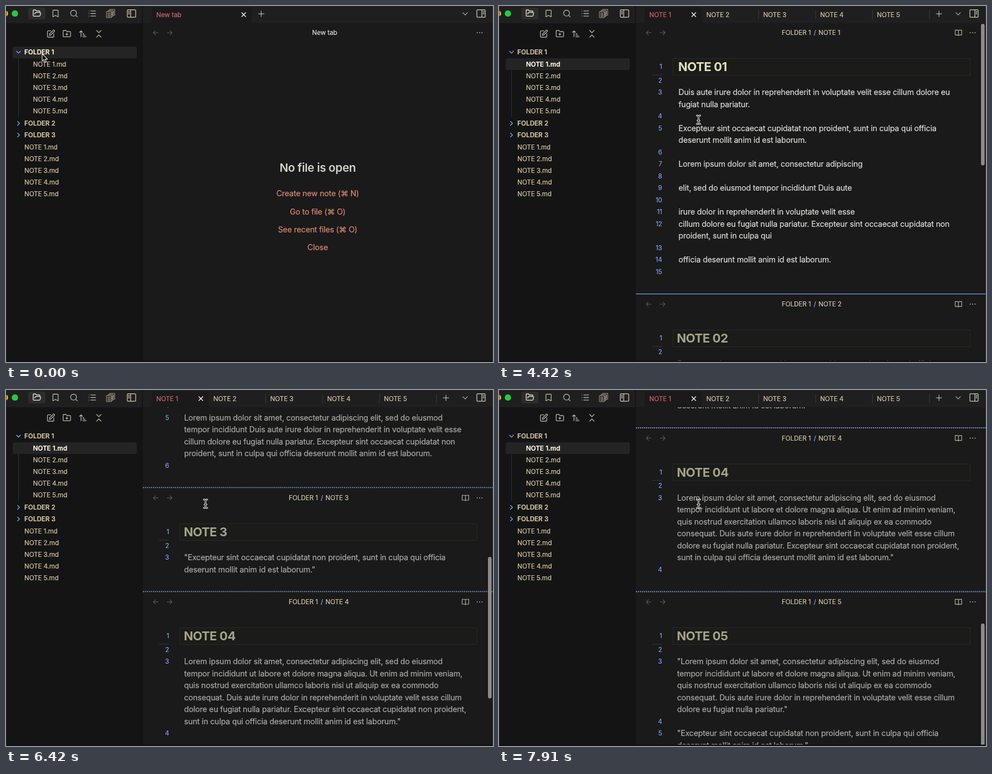
Animation of 875 by 640 pixels, one loop 8000 ms. Source, as an HTML page:

```html
<!DOCTYPE html>
<html lang="en">
<head>
<meta charset="utf-8">
<title>Notes in one scroll</title>
<style>
html, body { margin: 0; width: 100%; height: 100%; overflow: hidden; background: #1a1a1a; }
svg { display: block; width: 875px; height: 640px; }
text { font-family: Inter, "Noto Sans", sans-serif; font-optical-sizing: none; stroke-width: .22px; }
.ui { font-size: 11.6px; letter-spacing: -.08px; }
.bold { font-size: 11.6px; font-weight: 600; letter-spacing: .04px; }
.body { font-size: 14px; letter-spacing: -.145px; }
.head { font-size: 22px; font-weight: 700; letter-spacing: -.45px; stroke-width: 0; }
.big { font-size: 20.6px; font-weight: 600; letter-spacing: -.3px; stroke-width: 0; }
.num { font-size: 11.2px; }
.menu { filter: drop-shadow(0 8px 12px rgba(0, 0, 0, .28)); }
</style>
</head>
<body>
<svg id="stage" viewBox="0 0 875 640"></svg>
<script>
const LOOP = 8000, STEP = 86.1;
const SAND = '#d5c4a1', CREAM = '#fbf6d6', ICON = '#b9b09c', BLUE = '#7da4f5',
      RED = '#d0646b', LIGHT = '#dbd8d2', LINK = '#d98870', DIM = '#5c5a57';

// Icons on a 24 unit grid
const icons = {
  folder: 'M6 14l1.5-3A2 2 0 0 1 9.2 10H20a2 2 0 0 1 2 2.5l-1.6 6a2 2 0 0 1-2 1.5H4a2 2 0 0 1-2-2V5a2 2 0 0 1 2-2h4l3 3h7a2 2 0 0 1 2 2v2',
  bookmark: 'M19 21l-7-4-7 4V5a2 2 0 0 1 2-2h10a2 2 0 0 1 2 2z',
  search: 'M21 21l-4.3-4.3M19 11a8 8 0 1 1-16 0 8 8 0 0 1 16 0z',
  list: 'M8 5h13M8 12h13M8 19h13M3 5h.01M3 12h.01M3 19h.01',
  pages: 'M1 7h13v16H1zM5 7V4h13v16h-4M9 4V1h14v16h-5M4 11h7M4 14h7M4 17h7M4 20h7M16 8v9M20 5v9',
  left: 'M4 3h16a2 2 0 0 1 2 2v14a2 2 0 0 1-2 2H4a2 2 0 0 1-2-2V5a2 2 0 0 1 2-2zM10 3v18M5 7h2M5 10h2M5 13h2',
  right: 'M4 3h16a2 2 0 0 1 2 2v14a2 2 0 0 1-2 2H4a2 2 0 0 1-2-2V5a2 2 0 0 1 2-2zM14 3v18M17 7h2M17 10h2M17 13h2',
  edit: 'M12 4H5a2 2 0 0 0-2 2v13a2 2 0 0 0 2 2h13a2 2 0 0 0 2-2v-7M18.4 2.6a2.1 2.1 0 0 1 3 3L12 15l-4 1 1-4z',
  folderPlus: 'M12 10v6M9 13h6M4 20h16a2 2 0 0 0 2-2V8a2 2 0 0 0-2-2h-8l-2-3H4a2 2 0 0 0-2 2v13a2 2 0 0 0 2 2z',
  sort: 'M3 8l4-4 4 4M7 4v16M12 12h3M12 16h6M12 20h9',
  collapse: 'M6 21l6-6 6 6M6 3l6 6 6-6',
  down: 'M5 8.5l7 7 7-7',
  next: 'M8.5 5l7 7-7 7',
  close: 'M5 5l14 14M19 5L5 19',
  plus: 'M12 4v16M4 12h16',
  back: 'M20 12H4M11 5l-7 7 7 7',
  forth: 'M4 12h16M13 5l7 7-7 7',
  more: 'M4 12h.01M12 12h.01M20 12h.01',
  book: 'M12 6c0-2-2-2-3-2H2v15h7c2 0 3 1 3 2 0-1 1-2 3-2h7V4h-7c-1 0-3 0-3 2zv15',
  scroll: 'M8 21h12a2 2 0 0 0 2-2v-2H10v2a2 2 0 0 1-4 0V5a2 2 0 0 0-4 0v3h4M4 3h13a2 2 0 0 1 2 2v12M10 8h5M10 12h5',
  grid: 'M3 3h7v8H3zM14 3h7v5h-7zM14 12h7v9h-7zM3 15h7v6H3z',
  tree: 'M3 3v15a2 2 0 0 0 2 2h7M3 8h9M13 4h4l1 2h4v5h-9zM13 15h4l1 2h4v5h-9z',
  folderSearch: 'M11 20H4a2 2 0 0 1-2-2V5a2 2 0 0 1 2-2h5l2 3h9a2 2 0 0 1 2 2v3M20 17a3 3 0 1 1-6 0 3 3 0 0 1 6 0zM22 22l-3-3',
  arrow: 'M6 18L18 6M8 6h10v10',
  code: 'M5 2h9l6 6v14H5zM14 2v6h6M10 12c-2 0 0 3-2 3 2 0 0 3 2 3M14 12c2 0 0 3 2 3-2 0 0 3-2 3',
  pen: 'M13 21h8M17 3a2.8 2.8 0 0 1 4 4L8 20l-5 1 1-5z',
  trash: 'M3 6h18M19 6v15H5V6M8 6V3h8v3M10 11v6M14 11v6'
};
const frame = 'M3 3h18v18H3z';
icons.splitLeft = frame + 'M8 3v18M16 9l-3 3 3 3';
icons.splitRight = frame + 'M16 3v18M8 9l3 3-3 3';
icons.splitDown = frame + 'M3 16h18M9 8l3 3 3-3';
icons.splitUp = frame + 'M3 8h18M9 16l3-3 3 3';
icons.append = frame + 'M8 7h8M12 9v8M8 13l4 4 4-4';
icons.replace = frame + 'M9 9l3-3 3 3M9 15l3 3 3-3';

const icon = (name, x, y, size = 16, color = ICON, weight = 2) =>
  `<path d="${icons[name]}" transform="translate(${x - size / 2} ${y - size / 2}) scale(${size / 24})" fill="none" stroke="${color}" stroke-width="${weight}" stroke-linecap="round" stroke-linejoin="round"/>`;
const rect = (x, y, w, h, fill, extra = '') =>
  `<rect x="${x}" y="${y}" width="${w}" height="${h}" fill="${fill}" ${extra}/>`;
const sizes = { ui: 11.6, bold: 11.6, body: 14, head: 22, big: 20.6, num: 11.2 };
const text = (str, x, y, cls = 'ui', fill = LIGHT, anchor = 'start') =>
  `<text class="${cls}" x="${x}" y="${y + sizes[cls] * .355}" fill="${fill}" stroke="${fill}" text-anchor="${anchor}">${str}</text>`;

// Each line of a note is one numbered paragraph; "|" marks a wrap
const EX = 'Excepteur sint occaecat cupidatat non proident, sunt in culpa qui officia|deserunt mollit anim id est laborum.';
const LOREM = 'Lorem ipsum dolor sit amet, consectetur adipiscing elit, sed do eiusmod|tempor incididunt ';
const LONG = LOREM + 'ut labore et dolore magna aliqua. Ut enim ad minim veniam,|quis nostrud exercitation ullamco laboris nisi ut aliquip ex ea commodo|consequat. Duis aute irure dolor in reprehenderit in voluptate velit esse cillum|dolore eu fugiat nulla pariatur.';
const notes = [
  ['NOTE 01', ['Duis aute irure dolor in reprehenderit in voluptate velit esse cillum dolore eu|fugiat nulla pariatur.', '', EX, '',
    'Lorem ipsum dolor sit amet, consectetur adipiscing', '', 'elit, sed do eiusmod tempor incididunt Duis aute', '',
    'irure dolor in reprehenderit in voluptate velit esse',
    'cillum dolore eu fugiat nulla pariatur. Excepteur sint occaecat cupidatat non|proident, sunt in culpa qui', '',
    'officia deserunt mollit anim id est laborum.', '']],
  ['NOTE 02', [EX, '', LOREM + 'Duis aute irure dolor in reprehenderit in voluptate velit esse|cillum dolore eu fugiat nulla pariatur. Excepteur sint occaecat cupidatat non|proident, sunt in culpa qui officia deserunt mollit anim id est laborum.', '']],
  ['NOTE 3', [`"${EX}"`]],
  ['NOTE 04', [LONG + ' Excepteur sint occaecat cupidatat non proident,|sunt in culpa qui officia deserunt mollit anim id est laborum."', '']],
  ['NOTE 05', [`"${LONG}"`, '', `"${EX}"`, '']]
];

const mainMenu = [
  [['scroll', 'Continuous Mode']],
  [['edit', 'New note'], ['folder', 'New folder'], ['grid', 'New canvas']],
  [['tree', 'Move folder to...'], ['folderSearch', 'Search in folder'], ['bookmark', 'Bookmark...']],
  [['arrow', 'Reveal in Wexlor']],
  [['code', 'Create Code File'], ['pages', 'Create Longform Project']],
  [['pen', 'Rename...'], ['trash', 'Delete']]
];
const subMenu = [
  [['splitLeft', 'Open folder in new split left'], ['splitRight', 'Open folder in new split right'],
   ['splitDown', 'Open folder in new split down'], ['splitUp', 'Open folder in new split up']],
  [['append', 'Open or append folder in active tab group'], ['replace', 'Replace active tab group with folder']]
];

function menu(groups, x, y, w, h, firstRow, isHot) {
  let out = rect(x + .5, y + .5, w, h, '#222', 'rx="6" stroke="#434343"'), row = firstRow;
  for (const group of groups) {
    for (const [name, label] of group) {
      const color = label === 'Delete' ? '#f0464c' : null;
      if (isHot(row)) out += rect(x + 5.5, row - 10.7, w - 10, 21.4, '#343434', 'rx="4"');
      out += icon(name, x + 20.5, row, 14, color || '#c9bfa6', name === 'pages' ? 1.3 : 2)
        + text(label, x + 34.5, row, 'ui', color || LIGHT);
      if (label === 'Continuous Mode') out += icon('next', x + 160.5, row, 12, '#c9bfa6');
      row += 21.5;
    }
    row += 11.7;
  }
  return `<g class="menu">${out}</g>`;
}

function chrome(open, menuOpen) {
  let out = rect(0, 0, 875, 640, '#1a1a1a') + rect(0, 0, 875, 31, '#1f1f1f') + rect(0, 31, 245, 609, '#141414')
    + rect(244, 0, 1.5, 640, '#131313')
    + '<circle cx="-2" cy="13.5" r="5.7" fill="#f6be0f"/><circle cx="16" cy="13.5" r="5.7" fill="#27c840"/>'
    + rect(40, 3, 31, 21, '#2d2d2d', 'rx="4"')
    + icon('folder', 55.5, 13, 16, menuOpen ? RED : '#f2ecd2');
  ['bookmark', 'search', 'list', 'pages', 'left'].forEach((name, i) =>
    out += icon(name, [89, 122, 155, 188, 225.5][i], 13.5, name === 'left' ? 18 : 16, ICON, name === 'pages' ? 1.3 : 2));
  ['edit', 'folderPlus', 'sort', 'collapse'].forEach((name, i) => out += icon(name, 80.5 + i * 28.8, 50, 16));

  const tabEnd = open ? 364 : 441;
  out += `<path d="M257 31q5 0 5-5V7q0-5 5-5H${tabEnd - 5}q5 0 5 5v19q0 5 5 5z" fill="#1a1a1a"/>`
    + text(open ? 'NOTE 1' : 'New tab', 270, 15.5, 'ui', menuOpen ? '#eae6dc' : RED)
    + icon('close', open ? 350 : 427, 15.5, 12, '#f2eee2', 3) + icon('plus', open ? 790.5 : 458.5, 14, 15)
    + icon('down', 825, 14, 14) + icon('right', 853.5, 13.5, 18);
  if (open) for (let i = 0; i < 4; i++)
    out += text('NOTE ' + (i + 2), 372.5 + i * 102.2, 15.5, 'ui', SAND) + rect(466 + i * 102.3, 7, 1, 17, '#3a3a3a');
  return out;
}

function sidebar(open, menuOpen, hover) {
  let out = rect(22, 95, 1, 104, '#333');
  if (hover) out += rect(12, 73, 223, 21, '#242424', 'rx="3"');
  if (menuOpen) out += rect(11, 72, 225.5, 22.5, 'none', 'rx="4" stroke="#595959" stroke-width="2"');
  if (open) out += rect(12, 94, 223, 21, '#242424', 'rx="3"');
  [83, 211, 232].forEach((y, i) =>
    out += icon(i ? 'next' : 'down', 22.5, y, 12, BLUE, 2.6) + text('FOLDER ' + (i + 1), 33, y, 'bold', i || open ? SAND : CREAM));
  for (let i = 0; i < 5; i++) {
    const active = open && !i;
    out += text(`NOTE ${i + 1}.md`, 48.5, 104.7 + i * 21.1, active ? 'bold' : 'ui', active ? '#fffbe8' : SAND)
      + text(`NOTE ${i + 1}.md`, 33, 253.7 + i * 21.1, 'ui', SAND);
  }
  return out;
}

const arrows = y => icon('back', 269, y, 13, DIM) + icon('forth', 294, y, 13, DIM) + icon('more', 851, y, 13, ICON, 3.4);

function emptyView() {
  let out = arrows(48) + text('New tab', 572.5, 48, 'ui', LIGHT, 'middle')
    + text('No file is open', 560, 290.5, 'big', '#d3d1cc', 'middle');
  ['Create new note (⌘ N)', 'Go to file (⌘ O)', 'See recent files (⌘ O)', 'Close'].forEach((label, i) =>
    out += text(label, 560, 337.5 + i * 32.3, 'body', LINK, 'middle'));
  return out;
}

function notesView(scroll, caret) {
  let out = '', top = 29.5 - scroll;
  notes.forEach(([title, lines], i) => {
    const first = !i, x = first ? 322.5 : 320, head = top + 80;
    const number = (n, y) => text(n, 293, y, 'num', BLUE, 'end');
    if (i === 1) out += rect(246, top - .5, 628, 1.2, BLUE);
    if (i > 1) out += `<path d="M246 ${top}H874" stroke="${BLUE}" stroke-width="1.79" stroke-dasharray="1.79"/>`;
    out += arrows(top + 18.5) + icon('book', 825.5, top + 18.5, 14)
      + text('FOLDER 1', 508, top + 18.5, 'ui', SAND) + text('/', 565.5, top + 18.5, 'ui', BLUE)
      + text('NOTE ' + (i + 1), 574, top + 18.5, 'ui', SAND)
      + rect(312.5, head - 15, 534, 30, '#1b1b1a', 'stroke="#292822"')
      + rect(275, head + 14, 18, 1, '#383838')
      + text(title, x - .5, head, 'head', first ? '#e3e0b9' : '#a5a388')
      + number(1, head) + number(2, head + 24.5);
    if (first && caret) out += rect(321, head - 12, 1.6, 28, '#e8e4d0');
    let y = head + 46;
    lines.forEach((line, n) => {
      out += number(n + 3, y);
      for (const part of line.split('|')) {
        out += text(part, x, y, 'body', first ? '#dad9d6' : '#a9a8a5');
        y += 21.5;
      }
    });
    top = y + 18;
  });
  const thumb = 32 + scroll / 2.456;
  return `<g clip-path="url(#pane)">${out}${rect(866, thumb, 6.5, 254.5, '#8b8b8b', 'rx="3.2"')}</g>`;
}

// Scroll keys: step, offset, speed per step
const keys = [[-1, 0, 0], [5, 144.5, 42], [13, 470.5, 38], [25, 812.7, 27], [31, 948, 3]];
function scrollAt(t) {
  if (t >= 7905) return 952.5;
  const k = Math.max(-1, Math.min(31, Math.floor((t - 4778) / STEP)));
  const i = Math.max(1, keys.findIndex(key => k <= key[0]));
  const [k0, y0, v0] = keys[i - 1], [k1, y1, v1] = keys[i];
  const d = k1 - k0, u = (k - k0) / d, w = 1 - u;
  return w * w * (1 + 2 * u) * y0 + u * w * w * d * v0 + u * u * (3 - 2 * u) * y1 - u * u * w * d * v1;
}

// Stepped 0..1 progress, already moving at the start time
const progress = (t, start, steps) => Math.max(0, Math.min(1, (Math.floor((t - start) / STEP) + 1) / steps));
function pointerAt(t) {
  if (t < 630) return [65, 86];
  if (t < 1340) return [66, 87];
  if (t < 2480) {
    const p = progress(t, 1340 + STEP, 7), u = p * (2 - p);
    return [75 + 66 * u, 87 + 10 * u];
  }
  const p = progress(t, 2480, 9), u = p * p * (3 - 2 * p), w = 1 - u;
  return [w * w * 141 + 2 * u * w * 290 + u * u * 358, w * w * 97 + 2 * u * w * 95 + u * u * 204];
}

function pointer(x, y, beam) {
  if (!beam) return `<path d="M0 0v13.2l3-2.8 2.2 5 2.3-1-2.2-4.8h4.2z" transform="translate(${x} ${y})" fill="#050505" stroke="#eee" stroke-width="1.1" stroke-linejoin="round"/>`;
  const d = 'M-3-7.5q3 0 3 2.5q0-2.5 3-2.5M0-5V5M-3 7.5q3 0 3-2.5q0 2.5 3 2.5M-1.8 1.5h3.6';
  return `<g transform="translate(358.5 204.5)" fill="none" stroke-linecap="round"><path d="${d}" stroke="#eee" stroke-width="2.8"/><path d="${d}" stroke="#111" stroke-width="1"/></g>`;
}

function scene(t) {
  const menuOpen = t >= 630 && t < 3800, open = t >= 3890;
  const [x, y] = pointerAt(t);
  const caret = t < 4420 || (t >= 5020 && t < 5620);
  const near = row => Math.abs(y - row) < 10.75;
  let out = '<clipPath id="pane"><path d="M246 31h628v607h-628z"/></clipPath>' + chrome(open, menuOpen)
    + sidebar(open, menuOpen, t < 1340) + (open ? notesView(scrollAt(t), caret) : emptyView())
    + rect(0, 637.5, 875, 2.5, '#111')
    + rect(874, 0, 1, 640, '#303030') + rect(0, 0, .8, 640, '#262626');
  if (menuOpen) {
    const sub = t >= 1860;
    out += menu(mainMenu, 68, 89, 180.5, 327.5, 105.5, row => row < 110 && (sub || near(row)));
    if (sub) out += menu(subMenu, 251.5, 91, 274, 152, 107.4, row => x > 252 && near(row));
  }
  return out + pointer(x, y, open);
}

const stage = document.getElementById('stage');
let shown = '';
function tick() {
  const markup = scene(performance.now() % LOOP);
  if (markup !== shown) stage.innerHTML = shown = markup;
  requestAnimationFrame(tick);
}
tick();
</script>
</body>
</html>
```
